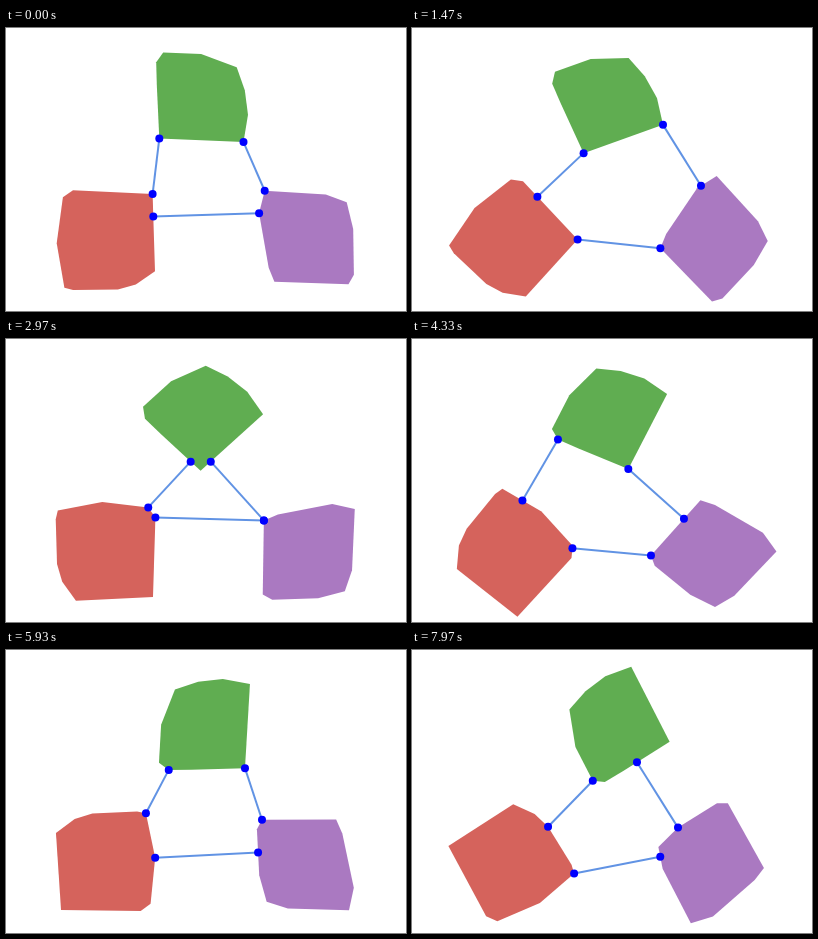
Animation, 400 px wide and 283 px high, one loop 8 s. Source, as an HTML page with a canvas:

```html
<!DOCTYPE html>
<html lang="en">
<head>
<meta charset="utf-8">
<title>Closest points between rotating polygons</title>
<style>
  html, body { margin: 0; width: 100%; height: 100%; overflow: hidden; background: #fff; }
  canvas { display: block; }
</style>
</head>
<body>
<canvas id="stage" width="400" height="283"></canvas>
<script>
const ctx = document.getElementById('stage').getContext('2d');
const WIDTH = 400, HEIGHT = 283;
const LOOP = 8000, STEPS = 240;

// Corners are relative to the centre; turn is in degrees per step.
const shapes = [
  { x: WIDTH / 2, y: HEIGHT / 4, turn: -0.5, color: '#60ad51',
    corners: [[37.5, 43.3], [-46.7, 39.8], [-49.2, -14], [-49.8, -36.4], [-42.8, -46.3],
              [-4.9, -44.8], [30.7, -31.6], [38.8, -8.5], [42, 16.1]] },
  { x: WIDTH / 4, y: HEIGHT * 3 / 4, turn: 1, color: '#d5635c',
    corners: [[-33, -50], [46.6, -46.2], [49, 30.9], [29.8, 44.3], [11.9, 49.2],
              [-32.9, 49.7], [-41.6, 47.5], [-49.3, 2.9], [-43.1, -43]] },
  { x: WIDTH * 3 / 4, y: HEIGHT * 3 / 4, turn: 1, color: '#aa79c1',
    corners: [[-41.3, -49.5], [19.8, -45.7], [40.7, -38.1], [47.2, -11.3], [47.9, 34.6],
              [42.5, 44], [-31.6, 41.6], [-37.3, 27.4], [-46.9, -27.1]] }
];

function place({ x, y, turn, corners }, step) {
  const angle = turn * step * Math.PI / 180;
  const c = Math.cos(angle), s = Math.sin(angle);
  return corners.map(([px, py]) => [x + px * c - py * s, y + px * s + py * c]);
}

function nearestOnSegment([px, py], [ax, ay], [bx, by]) {
  const dx = bx - ax, dy = by - ay;
  const along = ((px - ax) * dx + (py - ay) * dy) / (dx * dx + dy * dy);
  const k = Math.min(1, Math.max(0, along));
  return [ax + dx * k, ay + dy * k];
}

// The shortest link always has a corner of one polygon at one end.
function shortestLink(first, second) {
  let best = null, bestLength = Infinity;
  for (const [corners, outline] of [[first, second], [second, first]]) {
    for (const corner of corners) {
      outline.forEach((start, i) => {
        const end = outline[(i + 1) % outline.length];
        const point = nearestOnSegment(corner, start, end);
        const length = Math.hypot(point[0] - corner[0], point[1] - corner[1]);
        if (length < bestLength) {
          bestLength = length;
          best = [corner, point];
        }
      });
    }
  }
  return best;
}

function trace(points) {
  ctx.beginPath();
  points.forEach(([x, y]) => ctx.lineTo(x, y));
}

function drawLink(link) {
  trace(link);
  ctx.strokeStyle = '#6193e4';
  ctx.lineWidth = 2;
  ctx.stroke();
  ctx.fillStyle = '#00f';
  for (const [x, y] of link) {
    ctx.beginPath();
    ctx.arc(x, y, 4, 0, 2 * Math.PI);
    ctx.fill();
  }
}

function draw(step) {
  ctx.fillStyle = '#fff';
  ctx.fillRect(0, 0, WIDTH, HEIGHT);
  const polygons = shapes.map(shape => place(shape, step));
  polygons.forEach((points, i) => {
    trace(points);
    ctx.fillStyle = shapes[i].color;
    ctx.fill();
  });
  const [top, left, right] = polygons;
  [[top, left], [top, right], [left, right]].forEach(pair => drawLink(shortestLink(...pair)));
}

const startTime = performance.now();

function tick() {
  const time = (performance.now() - startTime) % LOOP;
  // Steps begin up to 4 ms early, on the nearest 10 ms.
  draw(Math.floor(time * STEPS / LOOP + 0.13) % STEPS);
  requestAnimationFrame(tick);
}
tick();
</script>
</body>
</html>
```
